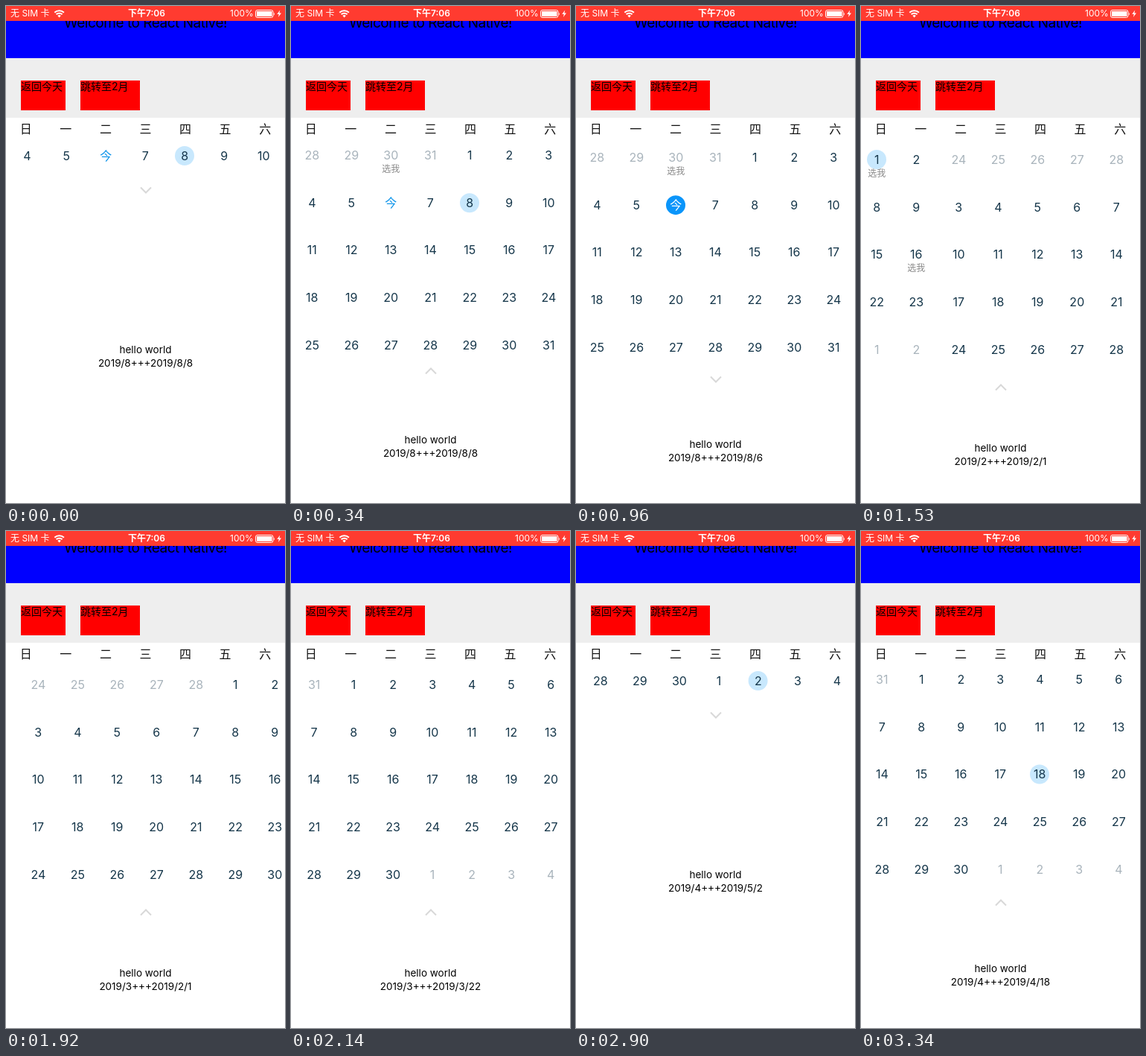
Recreate the animation shown at these times as an HTML page. Size 375 by 667 pixels, loop 3.36 s.

```html
<!DOCTYPE html>
<html lang="zh-CN">
<head>
<meta charset="utf-8">
<title>Calendar</title>
<style>
html, body { margin: 0; width: 100%; height: 100%; overflow: hidden; background: #fff; }
body { position: relative; font-family: Inter, "Noto Sans CJK SC", "Noto Sans CJK", sans-serif; color: #000; }
div, svg { position: absolute; white-space: nowrap; }
#title { top: 20px; width: 375px; height: 50px; background: #00f; overflow: hidden; }
#title div { top: -9px; width: 100%; text-align: center; font-size: 19px; line-height: 24px; letter-spacing: -.025em; }
#status { width: 375px; height: 20px; background: #ff3b30; color: #fff; font-size: 12px; line-height: 20px; }
#status div { top: 0; }
#tools { top: 70px; width: 375px; height: 80px; background: #eee; }
#tools div { top: 30px; height: 40px; background: #f00; font-size: 14px; line-height: 16px; }
#days { top: 155px; width: 375px; height: 20px; line-height: 20px; font-size: 16px; color: #111; }
#days div { width: 53.57px; text-align: center; }
#cal { top: 180px; width: 375px; overflow: hidden; }
.page { width: 375px; height: 330px; top: 0; left: 0; }
.day { width: 26px; height: 26px; border-radius: 50%; line-height: 26px; text-align: center; font-size: 16px; color: #15364a; }
.day.out { color: #a9b4bc; }
.day.today { color: #0a93ea; }
.day.on { background: #c8e8fd; }
.day.today.on { background: #0a95fa; color: #fff; }
.tag { width: 26px; left: 0; top: 24px; font-size: 12px; line-height: 16px; color: #8a8a8a; }
#arrow { left: 180px; top: -4px; overflow: visible; fill: none; stroke: #d8d8d8; stroke-width: 2; }
#info { width: 375px; top: 0; text-align: center; font-size: 13.5px; line-height: 17.5px; white-space: pre; }
</style>
</head>
<body>
<div id="title"><div>Welcome to React Native!</div></div>
<div id="status">
  <div style="left:6px">无 SIM 卡</div>
  <div style="left:0;width:378px;text-align:center;font-weight:600">下午7:06</div>
  <div style="left:301px">100%</div>
  <svg width="375" height="20" fill="none" stroke="#fff">
    <path d="M65.3 8.8a9 9 0 0 1 12.6 0M67.6 11.3a5.7 5.7 0 0 1 8 0" stroke-width="2"/>
    <path d="M69.4 13a3.1 3.1 0 0 1 4.4 0l-2.2 2.4z" fill="#fff" stroke="none"/>
    <rect x="335.5" y="5.5" width="23.5" height="10" rx="2.5"/>
    <path d="M337 7h20.5v7H337zM360 8.5q1.6 2 0 4zM368.3 5.5l-4 5.4h2.6l-1 4.1 4.2-5.6h-2.7z" fill="#fff" stroke="none"/>
  </svg>
</div>
<div id="tools">
  <div style="left:20px;width:60px">返回今天</div>
  <div style="left:100px;width:80px">跳转至2月</div>
</div>
<div id="days"></div>
<div id="cal"><div id="months"></div><div id="weeks"></div></div>
<svg id="arrow" width="15" height="8"><path d="M1 .5l7 7 7-7"/></svg>
<div id="info"></div>
<script>
const LOOP = 3360, STEP = 20, WIDTH = 375;
const SHUT = 247, OPEN = 512, ROW = 63.7, DROP = 5.5;
const TODAY = '8/6', TAGGED = ['7/30', '2/1', '2/16'];
const $ = id => document.getElementById(id);

// [time, arrow height]
const height = [
  [100, SHUT], [200, 483], [320, 483], [340, 490], [420, SHUT],
  [880, SHUT], [960, 501], [1040, 501], [1080, OPEN],
  [2320, OPEN], [2380, 319], [2400, 319], [2420, SHUT],
  [3280, SHUT], [3300, 350], [3320, 460], [3340, 499]
];
// [time, page]
const monthPos = [
  [1220, 0], [1240, 1], [1480, 1], [1520, 1.7253], [1840, 1.7253], [1900, 1.94], [1960, 2],
  [2040, 2], [2080, 2.65], [2100, 2.87], [2120, 2.96], [2140, 2.9925], [2160, 2.9925], [2180, 3]
];
const weekPos = [
  [2400, 0], [2420, 1], [2620, 1], [2680, 1.8], [2720, 1.97], [2760, 2],
  [2800, 2], [2850, 2.8], [2880, 2.96], [2900, 2.9877], [2920, 3],
  [2960, 3], [3020, 2.12], [3060, 2], [3100, 2], [3140, 1.06], [3160, 1]
];
// [time, month shown, chosen date]
const choices = [
  [0, 8, '8/8'], [700, 8, '8/6'], [1240, 2, '2/1'], [1920, 3, '2/1'], [2000, 3, '3/22'],
  [2180, 4, '3/22'], [2260, 4, '4/18'], [2700, 4, '4/25'], [2860, 4, '5/2'],
  [3020, 4, '4/25'], [3140, 4, '4/18']
];
const arrowUp = [[340, 420], [1080, 2420], [3340, LOOP]];

function at(keys, t) {
  const i = keys.findIndex(k => k[0] > t);
  if (i === 0) return keys[0][1];
  if (i < 0) return keys[keys.length - 1][1];
  const [t0, a] = keys[i - 1], [t1, b] = keys[i];
  return a + (b - a) * (t - t0) / (t1 - t0);
}

function add(parent, cls, text) {
  const el = document.createElement('div');
  el.className = cls;
  el.textContent = text;
  parent.append(el);
  return el;
}

const cells = [];

// month is 0 for a week strip, where no day is greyed
function addPage(host, index, month, startMonth, startDay, rows, firstY) {
  const page = add(host, 'page', '');
  page.style.left = index * WIDTH + 'px';
  for (let n = 0; n < rows * 7; n++) {
    const d = new Date(2019, startMonth - 1, startDay + n);
    const key = d.getMonth() + 1 + '/' + d.getDate();
    const out = month && d.getMonth() + 1 !== month;
    const el = add(page, 'day', key === TODAY ? '今' : d.getDate());
    el.style.left = 15.3 + 53 * (n % 7) + 'px';
    el.style.top = firstY - 193 + ROW * Math.floor(n / 7) + 'px';
    el.classList.toggle('out', !!out);
    el.classList.toggle('today', key === TODAY);
    if (TAGGED.includes(key)) add(el, 'tag', '选我');
    if (!out) cells.push({ el, key });
  }
}

[...'日一二三四五六'].forEach((c, i) => {
  add($('days'), '', c).style.left = i * WIDTH / 7 + 'px';
});
[[8, 7, 28], [2, 1, 27], [3, 2, 24], [4, 3, 31]].forEach(([m, sm, sd], i) =>
  addPage($('months'), i, m, sm, sd, 5, 206));
[[8, 4], [4, 14], [4, 21], [4, 28]].forEach(([m, d], i) =>
  addPage($('weeks'), i, 0, m, d, 1, 200.7));

let chosen;
function render(now) {
  const time = Math.max(0, now - start) % LOOP;
  const t = time - time % STEP;
  const h = at(height, t);
  const isWeek = h === SHUT;
  const [, month, date] = choices.filter(c => c[0] <= t).pop();

  if (chosen !== date + month) {
    chosen = date + month;
    cells.forEach(c => c.el.classList.toggle('on', c.key === date));
    $('info').textContent = `hello world\n2019/${month}+++2019/${date}`;
  }

  const activeRow = month === 4 ? 2 : 1;
  const lift = (OPEN - h) / (OPEN - SHUT) * (DROP + ROW * activeRow);
  $('months').style.display = isWeek ? 'none' : 'block';
  $('weeks').style.display = isWeek ? 'block' : 'none';
  $('months').style.transform = `translate(${-WIDTH * at(monthPos, t)}px, ${-lift}px)`;
  $('weeks').style.transform = `translateX(${-WIDTH * at(weekPos, t)}px)`;
  $('cal').style.height = h - 14 - 180 + 'px';

  const up = arrowUp.some(([a, b]) => t >= a && t < b);
  $('arrow').style.transform = `translateY(${h}px) scaleY(${up ? -1 : 1})`;
  $('info').style.transform = `translateY(${452.5 + (h - SHUT) / 2}px)`;
  requestAnimationFrame(render);
}
const start = performance.now();
render(start);
</script>
</body>
</html>
```
